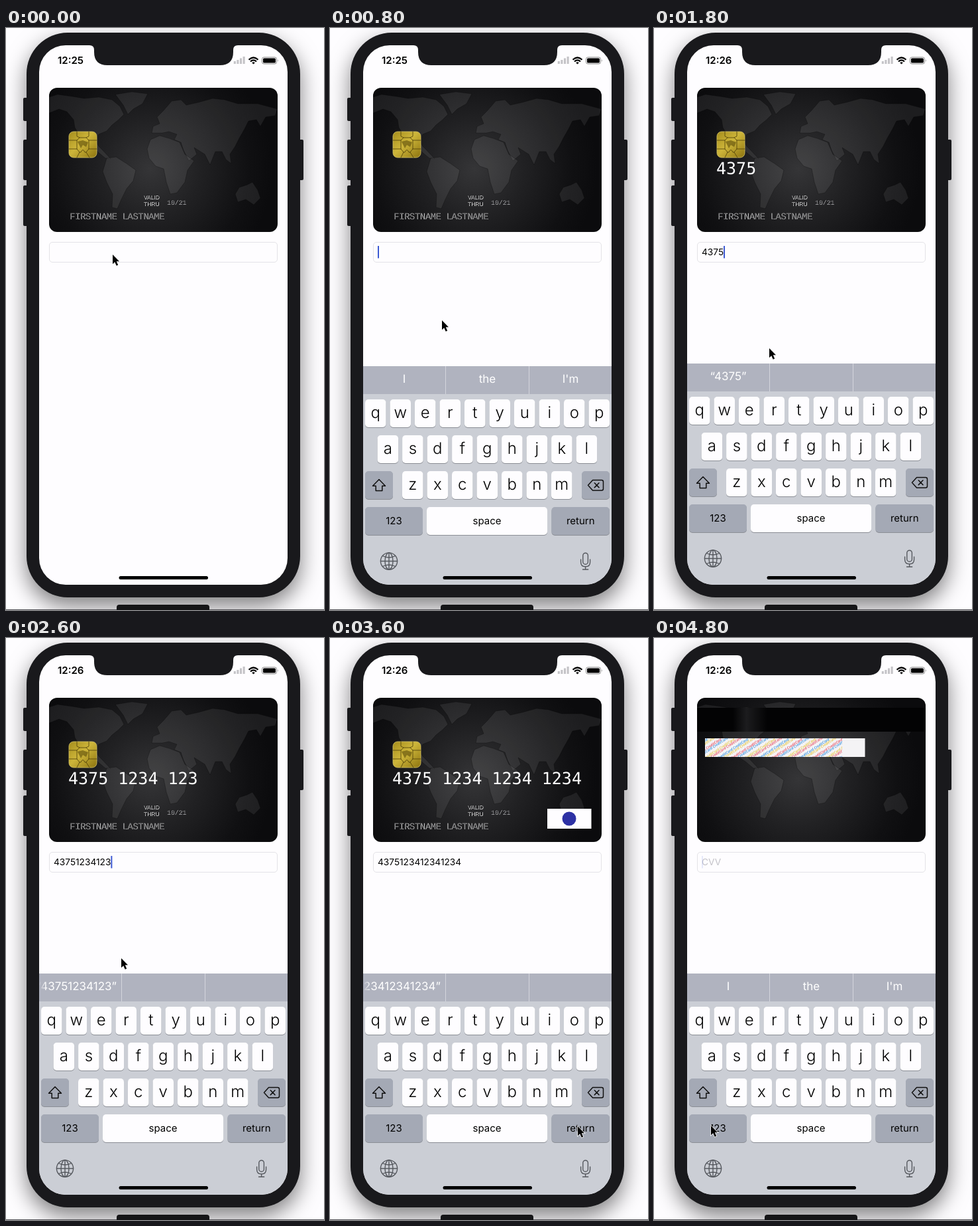
An HTML page that plays this animation: 480 by 876 pixels, repeating every 5 s.

```html
<!DOCTYPE html>
<html lang="en">
<head>
<meta charset="utf-8">
<title>Card entry</title>
<style>
  html, body { margin: 0; width: 100%; height: 100%; overflow: hidden; background: #fefdff; }
  svg { position: absolute; display: block; }
  #stage { left: 0; top: 0; }
  #card { left: 65px; top: 90px; }
  text { font-family: Inter, "Open Sans", sans-serif; text-rendering: geometricPrecision; white-space: pre; }
  .mid { text-anchor: middle; }
  .line { fill: none; stroke-linecap: round; stroke-linejoin: round; }
  .shell { fill: #19191c; filter: drop-shadow(0 13px 16px rgba(0, 0, 0, .5)); }
  .letter { font-size: 24px; font-weight: 350; }
  .label { font-size: 15px; }
  .hint { font-size: 17px; fill: #fff; }
  .number { font: 25px "DejaVu Sans Mono", monospace; fill: #fff; }
  .owner { font: 14px "Liberation Mono", monospace; letter-spacing: -.46px; }
  .small { font: 8.5px "Liberation Sans", sans-serif; }
  .date { font: 9.8px "Liberation Mono", monospace; }
  .print { font: italic 600 5.4px "Open Sans", sans-serif; }
</style>
</head>
<body>
<svg id="stage" width="480" height="876" viewBox="0 0 480 876">
  <defs>
    <clipPath id="screen"><rect x="50" y="26" width="375" height="812" rx="40"/></clipPath>
    <clipPath id="hintBox"><rect x="50" y="505" width="124" height="42"/></clipPath>
    <linearGradient id="fadeLeft">
      <stop offset="0" stop-color="#b0b3bf"/><stop offset="1" stop-color="#b0b3bf" stop-opacity="0"/>
    </linearGradient>
    <linearGradient id="fadeRight">
      <stop offset="0" stop-color="#b0b3bf" stop-opacity="0"/><stop offset="1" stop-color="#b0b3bf"/>
    </linearGradient>
    <radialGradient id="night" gradientUnits="userSpaceOnUse" cx="218" cy="212" r="185">
      <stop offset="0" stop-color="#353537"/><stop offset=".4" stop-color="#212123"/>
      <stop offset=".8" stop-color="#101012"/><stop offset="1" stop-color="#0b0b0d"/>
    </radialGradient>
    <linearGradient id="gold" x2="1" y2="1">
      <stop offset="0" stop-color="#a58d1c"/><stop offset=".45" stop-color="#cdb53a"/><stop offset="1" stop-color="#8d7410"/>
    </linearGradient>
    <linearGradient id="gloss">
      <stop offset="0" stop-color="#030304"/><stop offset=".4" stop-color="#1c1c1e"/><stop offset="1" stop-color="#030304"/>
    </linearGradient>
    <clipPath id="printBox"><rect x="77" y="151" width="207" height="28"/></clipPath>
    <g id="map" fill="#fff" fill-opacity=".075" stroke="#000" stroke-opacity=".25">
      <path d="M65 104L78 100 100 103 118 106 140 104 160 108 172 118 178 130 170 138 160 146 152 155 140 160 134 168 140 178 146 184 158 197 150 196 138 186 126 178 114 166 104 150 102 138 92 126 80 122 65 128Z"/>
      <path d="M165 100L190 96 214 99 206 114 192 122 184 130 177 116Z"/>
      <path d="M152 196L166 194 182 204 196 214 192 230 182 242 174 258 168 272 160 270 161 250 152 232 146 216Z"/>
      <path d="M220 158L222 148 232 144 228 134 238 124 250 110 264 108 272 116 290 112 312 106 330 108 350 114 380 114 410 122 406 132 392 134 384 148 378 138 366 140 360 152 352 166 346 178 338 190 340 204 332 198 326 186 316 186 308 206 300 190 284 180 288 190 276 200 268 184 264 172 254 168 258 160 246 156 236 158Z"/>
      <path d="M218 168L232 162 246 166 262 172 270 190 284 200 274 214 270 232 258 248 248 250 242 232 238 212 226 208 216 196 213 182Z"/>
      <path d="M346 250L352 240 364 236 372 232 380 244 384 256 374 266 362 258 350 262Z"/>
    </g>
  </defs>

  <rect class="shell" x="31" y="7" width="413" height="850" rx="62"/>
  <g fill="#19191c">
    <rect x="26" y="105" width="7" height="35" rx="2"/>
    <rect x="26" y="168" width="7" height="61" rx="2"/>
    <rect x="26" y="237" width="7" height="61" rx="2"/>
    <rect x="442" y="168" width="7" height="61" rx="2"/>
  </g>
  <rect y="875" width="480" height="1" fill="#55555a"/>
  <path d="M167 876V872Q167 868 171 868H303Q307 868 307 872V876Z" fill="#151517"/>

  <g clip-path="url(#screen)">
    <rect x="50" y="26" width="375" height="812" fill="#fefdff"/>
    <path d="M126 26Q133 26 133 33V36Q133 56 153 56H323Q343 56 343 36V33Q343 26 350 26Z" fill="#19191c"/>
    <text id="clock" x="78" y="54.3" font-size="15" font-weight="600"></text>
    <path d="M345.3 54V50M349.9 54V48M354.5 54V45.5M359.1 54V43" stroke="#c5c4c8" stroke-width="3.1" fill="none"/>
    <g class="line" stroke="#000" stroke-width="2.2" style="stroke-linecap: butt">
      <path d="M366.5 47.8Q373.5 41.2 380.5 47.8M369 50.5Q373.5 46.3 378 50.5"/>
      <path d="M371.2 52.2Q373.5 50.2 375.8 52.2L373.5 54.5Z" fill="#000" stroke="none"/>
    </g>
    <rect x="386.5" y="44" width="22" height="10" rx="2.8" fill="none" stroke="#888"/>
    <rect x="388" y="45.5" width="19" height="7" rx="1.6"/>
    <path d="M410 47.3Q411.6 49 410 50.8Z" fill="#888"/>

    <rect x="65.5" y="322.5" width="344" height="30" rx="4.5" fill="#fefdff" stroke="#e4e3e7"/>
    <text id="typed" x="72" y="342" font-size="13.7"></text>
    <text id="empty" x="72" y="342" font-size="13.7" fill="#c3c2c8">CVV</text>
    <rect id="caret" y="328" width="2" height="18.5" fill="#3c59d2"/>

    <g id="board">
      <rect x="50" y="505" width="375" height="340" fill="#cbced5"/>
      <rect x="50" y="505" width="375" height="42" fill="#b0b3bf"/>
      <path d="M174.5 505V547M300.5 505V547" stroke="#d3d5dc"/>
      <g id="words">
        <text class="hint mid" x="237.5" y="530.3">the</text>
        <text class="hint mid" x="363" y="530.3">I'm</text>
      </g>
      <g clip-path="url(#hintBox)">
        <text id="hint" class="hint" y="530.3"></text>
        <rect id="cutLeft" x="50" y="506" width="11" height="40" fill="url(#fadeLeft)"/>
        <rect id="cutRight" x="116" y="506" width="46" height="40" fill="url(#fadeRight)"/>
      </g>
      <g id="keys"></g>
      <g class="line" stroke="#111" stroke-width="1.5">
        <path d="M74 675.5L83.5 685.2H78.8V692.5H69.2V685.2H64.5Z"/>
        <path d="M396.5 676.5H410Q412.5 676.5 412.5 679V689.5Q412.5 692 410 692H396.5L389.5 684.2ZM399.3 680.8L406 687.6M406 680.8L399.3 687.6"/>
      </g>
      <g class="line" stroke="#55585e" stroke-width="1.4">
        <circle cx="89" cy="798.5" r="12.6"/>
        <ellipse cx="89" cy="798.5" rx="6" ry="12.6"/>
        <path d="M89 786V811M76.5 798.5H101.5M79.3 790.5Q89 795.5 98.7 790.5M79.3 806.5Q89 801.5 98.7 806.5"/>
        <rect x="381.8" y="786.2" width="7.6" height="17" rx="3.8"/>
        <path d="M378.6 796V800Q378.6 806.8 385.6 806.8T392.6 800V796M385.6 807V811M381.5 811H389.7"/>
      </g>
    </g>
    <rect x="170.5" y="825" width="134.5" height="5" rx="2.5"/>
  </g>

  <path id="pointer" d="M0 0V14.2L3.2 11.3 5.7 16.8 8.2 15.7 5.8 10.3H10Z" stroke="#fff" stroke-width="1.5" paint-order="stroke"/>
</svg>

<svg id="card" width="345" height="217" viewBox="65 90 345 217">
  <rect x="65" y="90" width="345" height="217" rx="12" fill="url(#night)"/>
  <use href="#map"/>
  <g id="front">
    <rect x="95" y="156" width="42" height="39" rx="7" fill="url(#gold)" stroke="#d8c768" stroke-width=".8"/>
    <path class="line" stroke="#57480c" stroke-width=".9" d="M95 169H107L111 165H121L125 169H137M95 182H107L111 187M125 182H137M125 182L121 187M107 169V182M125 169V182M107 156V163L111 165M125 156V163L121 165M107 195L111 187H113Q116 180 119 187H121L126 195"/>
    <path d="M108 171L116 169 124 172 121 179 116 176 113 181Z" fill="#6b5a10" opacity=".7"/>
    <text id="number" class="number" x="94" y="220"></text>
    <g id="badge">
      <rect x="328" y="257" width="66.5" height="30" fill="#fefdff"/>
      <circle cx="361" cy="272" r="10.5" fill="#2d31a4"/>
    </g>
  </g>
  <g id="back">
    <rect x="65" y="105" width="345" height="36" fill="#030304"/>
    <rect x="119" y="105" width="52" height="36" fill="url(#gloss)"/>
    <rect x="77" y="151" width="241.5" height="28" fill="#f4f3f5"/>
    <g id="print" clip-path="url(#printBox)"></g>
  </g>
</svg>

<script>
const $ = id => document.getElementById(id);

function add(parent, tag, attrs, text = '') {
  const node = document.createElementNS('http://www.w3.org/2000/svg', tag);
  for (const name in attrs) node.setAttribute(name, attrs[name]);
  node.textContent = text;
  return parent.appendChild(node);
}

function show(id, on) { $(id).style.display = on ? '' : 'none'; }

// Keyboard
const GREY = '#a4a9b5', WHITE = '#fefdff';

function key(x, y, w, label, kind, fill = WHITE) {
  add($('keys'), 'rect', { x, y: y + 1, width: w, height: 42, rx: 5, fill: '#8b8e95' });
  const face = add($('keys'), 'rect', { x, y, width: w, height: 42, rx: 5, fill });
  const base = y + (kind === 'letter' ? 28 : 26.3);
  add($('keys'), 'text', { x: x + w / 2, y: base, class: kind + ' mid' }, label);
  return face;
}

[['qwertyuiop', 53], ['asdfghjkl', 71.6], ['zxcvbnm', 109]].forEach(([row, left], r) =>
  [...row].forEach((c, i) => key(left + i * 37.5, 555 + r * 54, 31.5, c, 'letter')));
key(53, 663, 42, '', 'label', GREY);
key(380, 663, 42, '', 'label', GREY);
key(53, 717, 87, '123', 'label', GREY);
key(146, 717, 182, 'space', 'label');
const enter = key(334.5, 717, 87.5, 'return', 'label', GREY);

// Card print
function emboss(cls, x, y, text, light) {
  add($('front'), 'text', { class: cls, x, y, fill: light }, text);
  add($('front'), 'text', { class: cls, x: x - .6, y: y - .5, fill: '#19191b', 'fill-opacity': .6 }, text);
}
emboss('small', 208, 257.5, 'VALID', '#fff');
emboss('small', 208, 267.5, 'THRU', '#fff');
emboss('date', 243, 265.5, '10/21', '#b5b5b8');
emboss('owner', 96, 288, 'FIRSTNAME LASTNAME', '#eee');

const INKS = ['#2f8fe0', '#e6c437', '#e5475c'];
for (let i = 0; i < 25; i++) {
  add($('print'), 'text', {
    class: 'print', fill: INKS[i % 3],
    transform: `translate(${36 + i * 10.2} ${183 - i % 2 * 2}) rotate(-33)`
  }, 'CreditCard CreditCard');
}

// Each step changes some values and keeps the rest
const DIGITS = '4375123412341234', TICK = 200, LOOP = 5000;
const steps = [
  [0, { clock: '12:25', slide: 340, at: [161, 341], caret: 0, typed: 0, hint: 0, press: 0, back: 0, turn: 0 }],
  [600, { slide: 66, caret: 1 }],
  [800, { slide: 4, at: [169, 440] }],
  [1000, { slide: 0, at: [174, 482], caret: 0 }],
  [1200, { clock: '12:26', caret: 1 }],
  [1400, { typed: 2, hint: 2 }],
  [1600, { typed: 3, hint: 3 }],
  [1800, { typed: 4, hint: 4 }],
  [2000, { typed: 6, hint: 5 }],
  [2200, { typed: 8 }],
  [2400, { typed: 9, hint: 6 }],
  [2600, { typed: 11, hint: 11 }],
  [2800, { typed: 13, hint: 13 }],
  [3000, { typed: 14, hint: 14 }],
  [3200, { typed: 16, hint: 16 }],
  [3400, { at: [360, 714] }],
  [3600, { at: [374, 735], caret: 0 }],
  [3800, { press: 1, caret: 1 }],
  [4000, { press: 0, typed: 0, hint: 5, back: 1, turn: 12.3 }],
  [4200, { hint: 0, turn: 0 }],
  [4400, { caret: 0 }],
  [4600, { caret: 1 }],
  [4800, { caret: .12, at: [86, 734] }]
];

function stateAt(ms) {
  return Object.assign({}, ...steps.filter(([t]) => t <= ms).map(([, change]) => change));
}

function drawHint(s) {
  const wiping = s.back && s.hint > 0;
  const part = DIGITS.slice(0, s.hint);
  const node = $('hint');
  node.textContent = !s.hint ? 'I' : wiping ? '“' + part : `“${part}”`;
  const width = node.getComputedTextLength();
  const long = width > 110;
  node.setAttribute('x', wiping ? 101 : long ? 167 - width : 112 - width / 2);
  show('cutLeft', long);
  show('cutRight', wiping);
  show('words', s.back || !s.hint);
}

function draw(s) {
  const value = DIGITS.slice(0, s.typed);
  $('clock').textContent = s.clock;
  $('typed').textContent = value;
  $('number').textContent = value.replace(/(.{4})(?=.)/g, '$1 ');
  $('caret').setAttribute('x', 72 + (value ? $('typed').getComputedTextLength() : 0));
  $('caret').setAttribute('opacity', s.caret);
  $('board').setAttribute('transform', `translate(0 ${s.slide})`);
  $('pointer').setAttribute('transform', `translate(${s.at})`);
  enter.setAttribute('fill', s.press ? WHITE : GREY);
  show('empty', s.back);
  show('front', !s.back);
  show('back', s.back);
  show('badge', s.typed === DIGITS.length);
  $('card').style.transform = s.turn ? `perspective(981px) translateZ(-42px) rotateY(${s.turn}deg)` : 'none';
  $('card').style.filter = s.turn ? 'brightness(.88)' : 'none';
  drawHint(s);
}

const start = performance.now();
let last = -1;
function frame() {
  const ms = (performance.now() - start) % LOOP;
  const tick = Math.floor(ms / TICK);
  if (tick !== last) draw(stateAt(tick * TICK));
  last = tick;
  requestAnimationFrame(frame);
}
frame();
</script>
</body>
</html>
```
